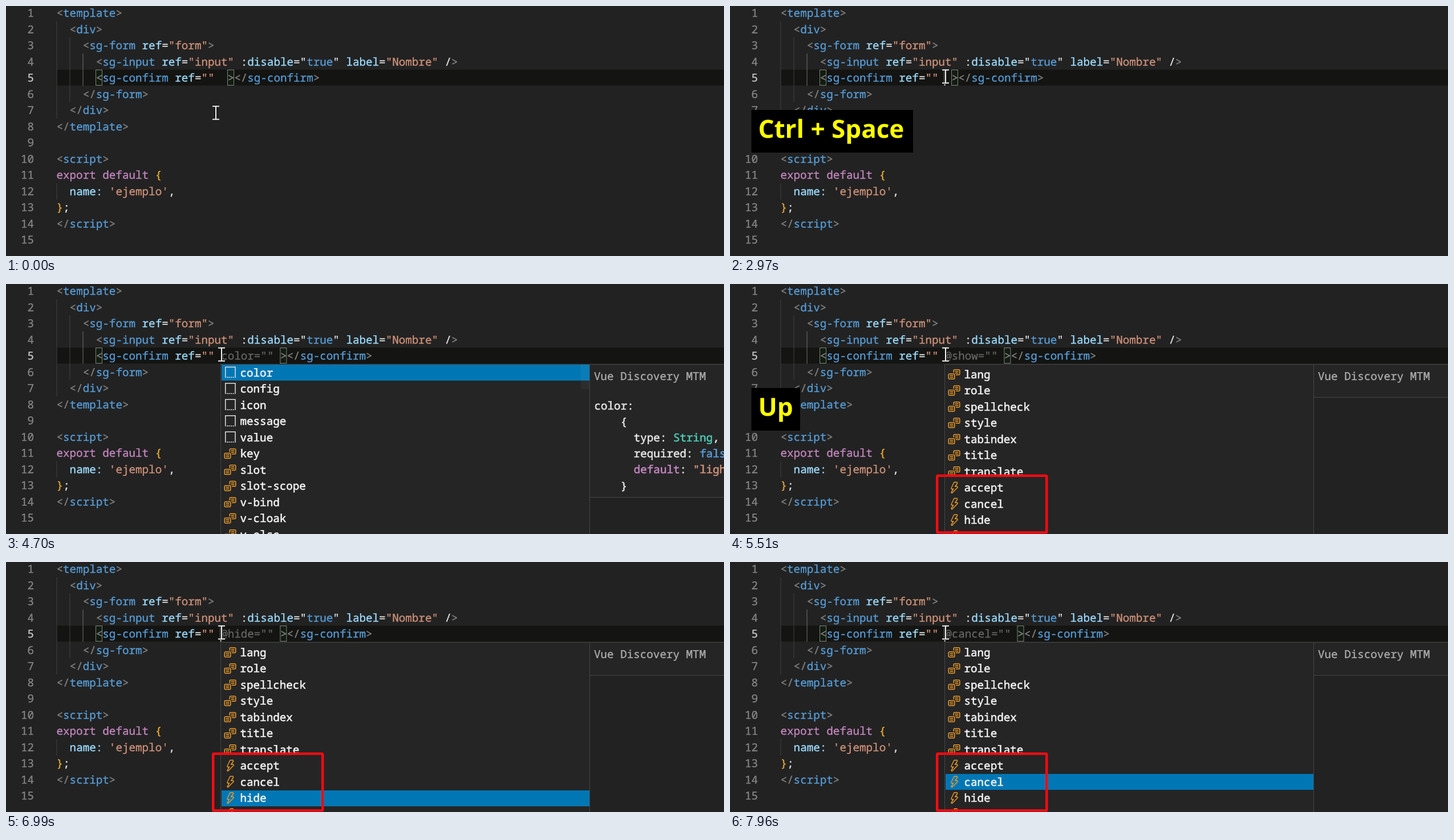
Recreate the animation shown at these times as an HTML page. Size 1259 by 440 pixels, loop 8000 ms.

```html
<!DOCTYPE html>
<html lang="es">
<head>
<meta charset="utf-8">
<title>Autocompletado</title>
<style>
  html, body { margin: 0; width: 100%; height: 100%; overflow: hidden; background: #222; }
  svg { display: block; width: 1259px; height: 440px; }
  text {
    font: 19.24px 'Noto Sans Mono', 'DejaVu Sans Mono', monospace;
    white-space: pre;
    text-rendering: geometricPrecision;
    stroke-width: .35px;
  }
  .list text, .details text { stroke-width: .6px; }
  .key text { font: bold 44px 'Noto Sans', 'Open Sans', sans-serif; }
</style>
</head>
<body>
<svg id="stage" viewBox="0 0 1259 440"></svg>
<script>
const LOOP = 8000, CHAR = 11.545, LEFT = 88.5, ROW = 28.5;
const stage = document.getElementById('stage');

const COLORS = {
  g: '#808080', b: '#569cd6', a: '#9cdcfe', s: '#ce9178', w: '#e4e4e4',
  p: '#c586c0', y: '#e8ab2e', t: '#4ec9b0', f: '#f2f2f2'
};

const CODE = [
  '~g<~btemplate~g>',
  '  ~g<~bdiv~g>',
  '    ~g<~bsg-form~w ~aref~w=~s"form"~g>',
  '      ~g<~bsg-input~w ~aref~w=~s"input"~w :~adisable~w="~btrue~w" ~alabel~w=~s"Nombre"~w /~g>',
  '      ~g<~bsg-confirm~w ~aref~w=~s""',
  '    ~g</~bsg-form~g>',
  '  ~g</~bdiv~g>',
  '~g</~btemplate~g>',
  '',
  '~g<~bscript~g>',
  '~pexport default ~y{',
  '  ~aname: ~s\'ejemplo\'~w,',
  '~y}~w;',
  '~g</~bscript~g>',
  ''
];
const PROPS = ['color', 'config', 'icon', 'message', 'value'];
const ATTRS = ['key', 'slot', 'slot-scope', 'v-bind', 'v-cloak', 'v-else'];
const TAIL = ['lang', 'role', 'spellcheck', 'style', 'tabindex', 'title', 'translate'];
const EVENTS = ['accept', 'cancel', 'hide', 'remove'];

// Icons on a 16-unit grid.
const ICONS = {
  prop: ['#e0e0e0', 'M2 14V1h12.5v13h-1V2H3v12zM4 13h1.5v1H4zM6.2 13h1.5v1H6.2zM8.6 13h1.5v1H8.6zM11 13h1.5v1H11z'],
  attr: ['#ee9d28', 'M14 2H8L7 3v3h1V3h6v5h-4v1h4l1-1V3zM9 6h4v1H9.4L9 6.6zM2 7L1 8v5l1 1h6l1-1V8L8 7zM8 13H2V8h6zM3 9h4v1H3zM3 11h4v1H3zM9 4h4v1H9z'],
  event: ['#ee9d28', 'M7.4 1.6L8.3 1h3.3l.8 1.6L10.2 6H12l.7 1.7L5.6 15 4 13.8 6.1 10H4.9L4 9zM7.8 9l-2.9 5.3L12 7H8.3l3.3-5H8.3L4.9 9z']
};

function el(tag, attrs = {}, parent = stage) {
  const node = document.createElementNS('http://www.w3.org/2000/svg', tag);
  for (const key in attrs) node.setAttribute(key, attrs[key]);
  parent.appendChild(node);
  return node;
}
const rect = (x, y, width, height, fill, parent) => el('rect', { x, y, width, height, fill }, parent);
const col = n => LEFT + n * CHAR;

// Glyphs get a thin outline of their own colour for a sturdier weight.
const ink = color => ({ fill: color, stroke: color });

// "~" followed by a palette letter switches the colour.
function text(x, middle, marked, parent, color = COLORS.w, anchor = 'start') {
  const node = el('text', { x, y: middle + 6.5, 'text-anchor': anchor, ...ink(color) }, parent);
  marked.split('~').forEach((part, i) => {
    const span = el('tspan', i ? ink(COLORS[part[0]]) : {}, node);
    span.textContent = i ? part.slice(1) : part;
  });
  return node;
}
const show = (node, on) => node.setAttribute('visibility', on ? 'visible' : 'hidden');
const between = (t, from, to) => t >= from && t < to;
const group = (cls, parent) => el('g', { class: cls }, parent);

function bracket(x, parent) {
  el('rect', { x: x + .5, y: 112.5, width: 11, height: 27, fill: '#0064001a', stroke: '#7c857c' }, parent);
}

// Editor
rect(0, 0, 1259, 440, '#222');
rect(89, 112, 1170, 28, '#141412');
rect(88.5, 27, 1, 171, '#404040');
rect(111.5, 55, 1, 114, '#404040');
rect(134.5, 83.5, 1, 57, '#707070');
rect(88.5, 312, 1, 28.5, '#404040');
bracket(157);
CODE.forEach((line, i) => {
  const middle = 12.5 + i * ROW;
  text(49, middle, String(i + 1), stage, i === 4 ? '#c6c6c6' : '#858585', 'end');
  text(LEFT, middle, line);
});
const ghost = text(col(25), 126.5, '', stage, '#646464');
const closing = group('closing');
bracket(388, closing);
text(col(26), 126.5, '~g></~bsg-confirm~g>', closing);
const caret = rect(375.5, 112, 2.2, 28, '#c4c4c0');

// Suggestion popup
const popup = group('popup');
rect(376, 141, 648, 300, '#454545', popup);
rect(377, 142, 646, 300, '#252526', popup);
const marker = rect(378, 142, 645, 28, '#0077b5', popup);

function list(first, rows) {
  const g = group('list', popup);
  rows.forEach(([kind, label], i) => {
    const y = first + i * ROW;
    const [fill, d] = ICONS[kind];
    el('path', { d, fill, 'fill-rule': 'evenodd', transform: `translate(381 ${y - 12}) scale(1.5)` }, g);
    text(410.5, y, '~f' + label, g);
  });
  return g;
}
const rowsOf = (kind, labels) => labels.map(label => [kind, label]);
const topList = list(156, [...rowsOf('prop', PROPS), ...rowsOf('attr', ATTRS)]);
const endList = list(159, [...rowsOf('attr', TAIL), ...rowsOf('event', EVENTS)]);
const slider = rect(1008, 142, 15, 43, '#e3e3e3', popup);

// Documentation panel
const docs = group('docs', popup);
const panel = el('rect', { x: 1023.5, y: 141.5, width: 240, fill: '#252526', stroke: '#454545' }, docs);
text(1031, 162.5, 'Vue Discovery MTM', docs, '#adadad');
const details = group('details', docs);
[
  'color:',
  '    {',
  '      type: ~tString~w,',
  '      required: ~bfalse~w,',
  '      ~pdefault~w: ~s"light"~w,',
  '    }'
].forEach((line, i) => text(1031.5, 214.5 + i * 28.1, line, details));

const frame = el('rect', {
  x: 363.2, y: 337.4, width: 192, height: 100, rx: 1.5,
  fill: 'none', stroke: '#ff0a12', 'stroke-width': 4.4
});

// Pressed keys
function key(label, width) {
  const g = group('key');
  rect(37.5, 183, width, 75, '#000', g);
  el('text', { x: 49.5, y: 231.5, fill: '#ffff00' }, g).textContent = label;
  return g;
}
const ctrlSpace = key('Ctrl + Space', 283.5);
const up = key('Up', 85.5);

// Pointer
const pointer = group('pointer');
const beam = 'M-6-11.5H6M-6 11.5H6M0-11.5V11.5';
el('path', { d: beam, stroke: '#111', 'stroke-width': 4, fill: 'none' }, pointer);
el('path', { d: beam, stroke: '#f4f4f4', 'stroke-width': 2, fill: 'none' }, pointer);
const click = el('circle', { cx: 375, cy: 122, r: 18, fill: '#ffff00', 'fill-opacity': .6 });

const CARET_ON = [[1920, 2430], [2920, 3380], [3880, 4400], [4900, 5410], [5920, 6420], [6890, 7390], [7910, 8000]];
// Time, highlighted row top (or off stage), suggested attribute.
const PICKS = [
  [0, 500, ''], [3530, 142, 'color'], [5410, 500, '@show'], [6690, 430, '@remove'],
  [6990, 402, '@hide'], [7140, 373, '@cancel'], [7610, 345, '@accept'], [7960, 373, '@cancel']
];

function movePointer(t) {
  const step = t < 1150 ? 0 : Math.min(10, Math.floor((t - 1150) * 9 / 570) + 1);
  const u = step / 10, p = u * u * (3 - 2 * u);
  const nudge = between(t, 910, 1150) ? 1 : 0;
  const x = 368 - 22.97 * p + 32.97 * p * p;
  pointer.setAttribute('transform', `translate(${x.toFixed(1)} ${188 - nudge - 64 * p})`);
}

function draw(t) {
  movePointer(t);
  show(click, between(t, 1920, 2070));
  show(caret, CARET_ON.some(([from, to]) => between(t, from, to)));
  show(ctrlSpace, between(t, 2970, 4350));
  show(up, between(t, 5000, 6370));

  const [, top, name] = PICKS.filter(pick => t >= pick[0]).pop();
  const added = name ? name + '=""' : '';
  if (ghost.textContent !== added) ghost.textContent = added;
  closing.setAttribute('transform', `translate(${added.length * CHAR} 0)`);
  marker.setAttribute('y', top);

  const open = t >= 3530, atEnd = t >= 5410;
  popup.setAttribute('display', open ? 'inline' : 'none');
  show(topList, !atEnd);
  show(endList, atEnd);
  show(frame, atEnd);
  show(details, !atEnd);
  panel.setAttribute('height', atEnd ? 58 : 234);
  const fade = Math.floor((t - 4100) / 100 + 1) / 9;
  slider.setAttribute('opacity', .2 * (1 - Math.min(1, Math.max(0, fade))));
}

const start = performance.now();
function tick() {
  draw((performance.now() - start) % LOOP);
  requestAnimationFrame(tick);
}
tick();
</script>
</body>
</html>
```
